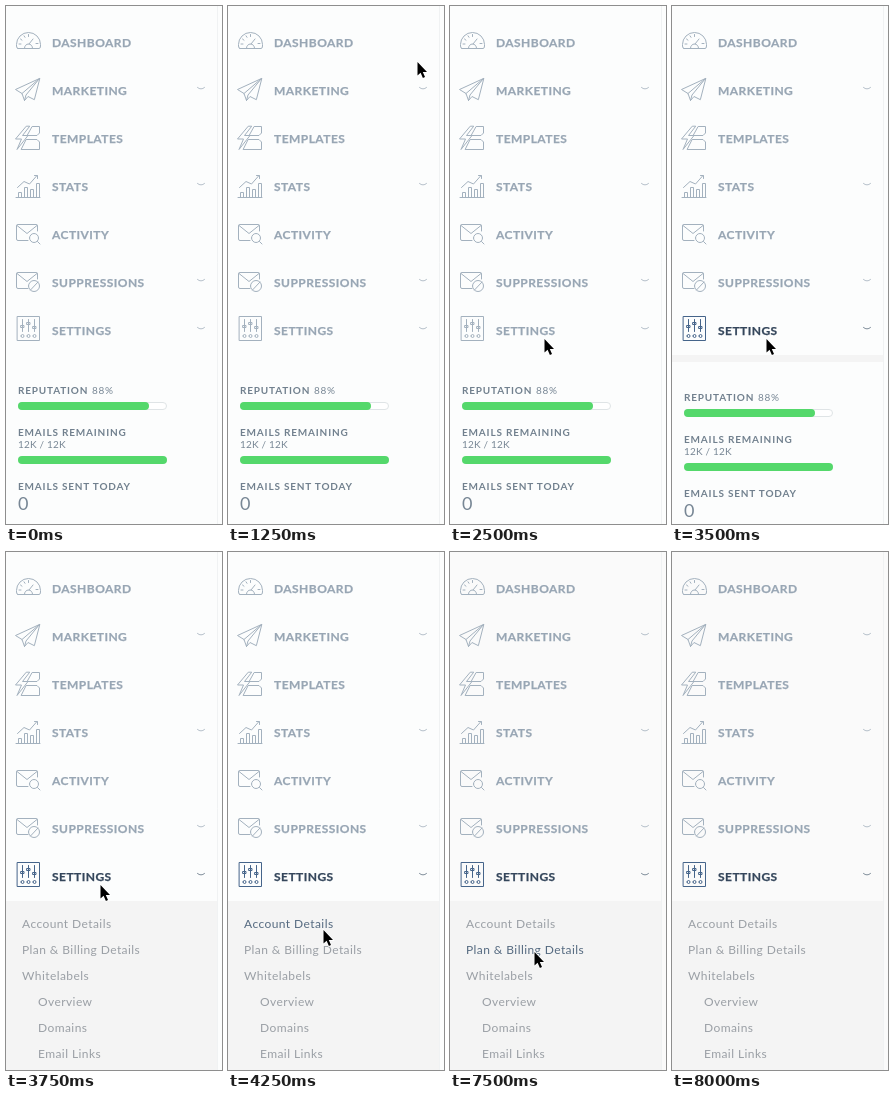
These frames come from a looping animation (216x518 px, 10 s). An HTML page:

```html
<!DOCTYPE html>
<html lang="en">
<head>
<meta charset="utf-8">
<title>Sidebar menu</title>
<style>
  html, body { margin: 0; width: 100%; height: 100%; overflow: hidden; background: #fcfdfd; }
  svg { display: block; width: 216px; height: 518px; }
  text { font-family: Lato, "Open Sans", sans-serif; }
  .item { fill: #98a6b4; stroke: #a3b1be; }
  .item text { font-size: 12px; font-weight: 700; letter-spacing: .45px; stroke: #98a6b4; stroke-width: .25; }
  .item path { fill: none; stroke-width: 1; stroke-linejoin: round; stroke-linecap: round; }
  .item .arrow { stroke: #b4bfc9; }
  .item.active { fill: #34465b; stroke: #45648a; }
  .item.active text { stroke: #34465b; }
  .item.active .arrow { stroke: #7d8b98; }
  .sub { font-size: 12px; letter-spacing: .42px; fill: #9a9fa5; }
  .sub.hover { fill: #556a80; }
  #footer text { font-size: 10px; letter-spacing: .2px; fill: #788795; }
  #footer .head { font-weight: 700; letter-spacing: .82px; fill: #71808e; }
  #footer .count { font-size: 18px; }
</style>
</head>
<body>
<svg viewBox="0 0 216 518">
  <rect id="back" width="216" height="518"/>
  <path d="M211.5 0V518" stroke="#f0f2f3"/>
  <g id="menu"></g>
  <rect id="panel" y="349" width="211" fill="#f4f4f4"/>
  <g id="subs"></g>
  <g id="footer">
    <text class="head" x="12" y="388">REPUTATION</text>
    <text x="86" y="388" style="letter-spacing:.7px">88%</text>
    <rect x="12.5" y="396.5" width="148" height="7" rx="3.5" fill="#fff" stroke="#dfe4e6"/>
    <rect x="12" y="396" width="131" height="8" rx="4" fill="#54d86b"/>
    <text class="head" x="12" y="430">EMAILS REMAINING</text>
    <text x="12" y="442">12K / 12K</text>
    <rect x="12" y="450" width="149" height="8" rx="4" fill="#54d86b"/>
    <text class="head" x="12" y="484">EMAILS SENT TODAY</text>
    <text class="count" x="12" y="504">0</text>
  </g>
  <path id="cursor" d="M1.5 1V14.5L4.6 11.8L6.9 17L9 16.1L6.8 11H11Z" stroke="#fff" stroke-width="1.4" paint-order="stroke"/>
</svg>
<script>
const $ = id => document.getElementById(id);
const ring = (x, y, r) => `M${x - r} ${y}a${r} ${r} 0 1 1 ${2 * r} 0a${r} ${r} 0 1 1 ${-2 * r} 0`;
const envelope = 'M22 18.5H12Q10.5 18.5 10.5 17V4Q10.5 2.5 12 2.5H30Q31.5 2.5 31.5 4V9M11 3.5L21 11.5L31 3.5';

// Icon paths are relative to the top of each row's icon area.
const items = [
  ['DASHBOARD', 'M12 18.5H33Q34.5 18.5 34.5 16V14.5A12 12 0 0 0 10.5 14.5V16Q10.5 18.5 12 18.5Z'
    + 'M18.5 18A4 4 0 0 1 26.5 18M23 14L27 9M13 14H15M14.5 9L16 10.2M18 5.8L19 7.3M22.5 4.5V6.5M30 13.5H32'],
  ['MARKETING', 'M33.5 .5L9.5 11.5L16 15.5L18.5 22.5L22 18.5L28 21.5ZM33.5 .5L16 15.5M33.5 .5L20 17L18.5 22.5', 1],
  ['TEMPLATES', 'M20 .5L9.5 13H15.5L11 23.5L22 9.5H16.5L23.5 .5Z'
    + 'M26.5 .5H33.5V7L31 9.5H21.5ZM20.5 13.5H31L33.5 16V23.5H15.5Z'],
  ['STATS', 'M10 23.5H34M12.5 23V18.5H15.5V23M18.5 23V13.5H21.5V23M24.5 23V15.5H27.5V23M30.5 23V9.5H33.5V23'
    + 'M11.5 13.5L18 7.5L23.5 10L31 1.5M28.5 1.5H31.5V4.5', 1],
  ['ACTIVITY', envelope + ring(28, 16, 4.5) + 'M31.5 19.5L34 22'],
  ['SUPPRESSIONS', envelope + ring(28, 16, 5.5) + 'M24.5 20L32 12', 1],
  ['SETTINGS', 'M11.5 -1.5H33.5V22.5H11.5Z'
    + [16.5, 22.5, 28.5].map((x, i) => {
        const y = [7.5, 4.5, 8.5][i];
        return `M${x} 1.5V13.5M${x - 1.5} ${y}H${x + 1.5}V${y + 2}H${x - 1.5}Z` + ring(x, 18, 1.5);
      }).join(''), 1]
];
$('menu').innerHTML = items.map(([label, icon, arrow], i) => `
  <g class="item" transform="translate(0 ${i * 48})">
    <path d="${icon}" transform="translate(0 24)"/>
    <text x="46" y="41">${label}</text>
    ${arrow ? '<path class="arrow" d="M191.5 33.5Q195 36.5 198.5 33.5"/>' : ''}
  </g>`).join('');

$('subs').innerHTML = ['Account Details', 'Plan &amp; Billing Details', 'Whitelabels', 'Overview', 'Domains', 'Email Links']
  .map((label, i) => `<text class="sub" x="${i < 3 ? 16 : 32}" y="${376 + i * 26}">${label}</text>`).join('');

const settings = $('menu').lastElementChild;
const subs = [...$('subs').children];

// Pointer stops: time, x, y; the pointer jumps from stop to stop.
const stops = [
  [1250, 188, 55], [1500, 125, 125], [1750, 95, 249], [2000, 93, 307], [2250, 93, 329], [2500, 93, 332],
  [4000, 93, 333], [4250, 94, 377], [4500, 85, 396], [4750, 84, 398], [5000, 83, 399], [7750, 158, 335]
];
const show = (el, on) => el.setAttribute('visibility', on ? 'visible' : 'hidden');

function draw(now) {
  const t = now % 10000;
  const open = t >= 3750;
  const opening = t >= 3500 && !open;

  $('back').setAttribute('fill', t < 7500 ? '#fcfdfd' : '#fafafa');
  settings.classList.toggle('active', t >= 3500);
  $('panel').setAttribute('height', open ? 169 : opening ? 7 : 0);
  $('footer').setAttribute('transform', `translate(0 ${opening ? 7 : 0})`);
  show($('footer'), !open);
  show($('subs'), open);
  subs[0].classList.toggle('hover', t >= 4250 && t < 4500);
  subs[1].classList.toggle('hover', t >= 4500 && t < 7750);

  const stop = stops.filter(s => s[0] <= t).pop();
  show($('cursor'), stop && t < 8000);
  if (stop) $('cursor').setAttribute('transform', `translate(${stop[1]} ${stop[2]})`);
}

const start = performance.now();
function tick() {
  draw(performance.now() - start);
  requestAnimationFrame(tick);
}
tick();
</script>
</body>
</html>
```
